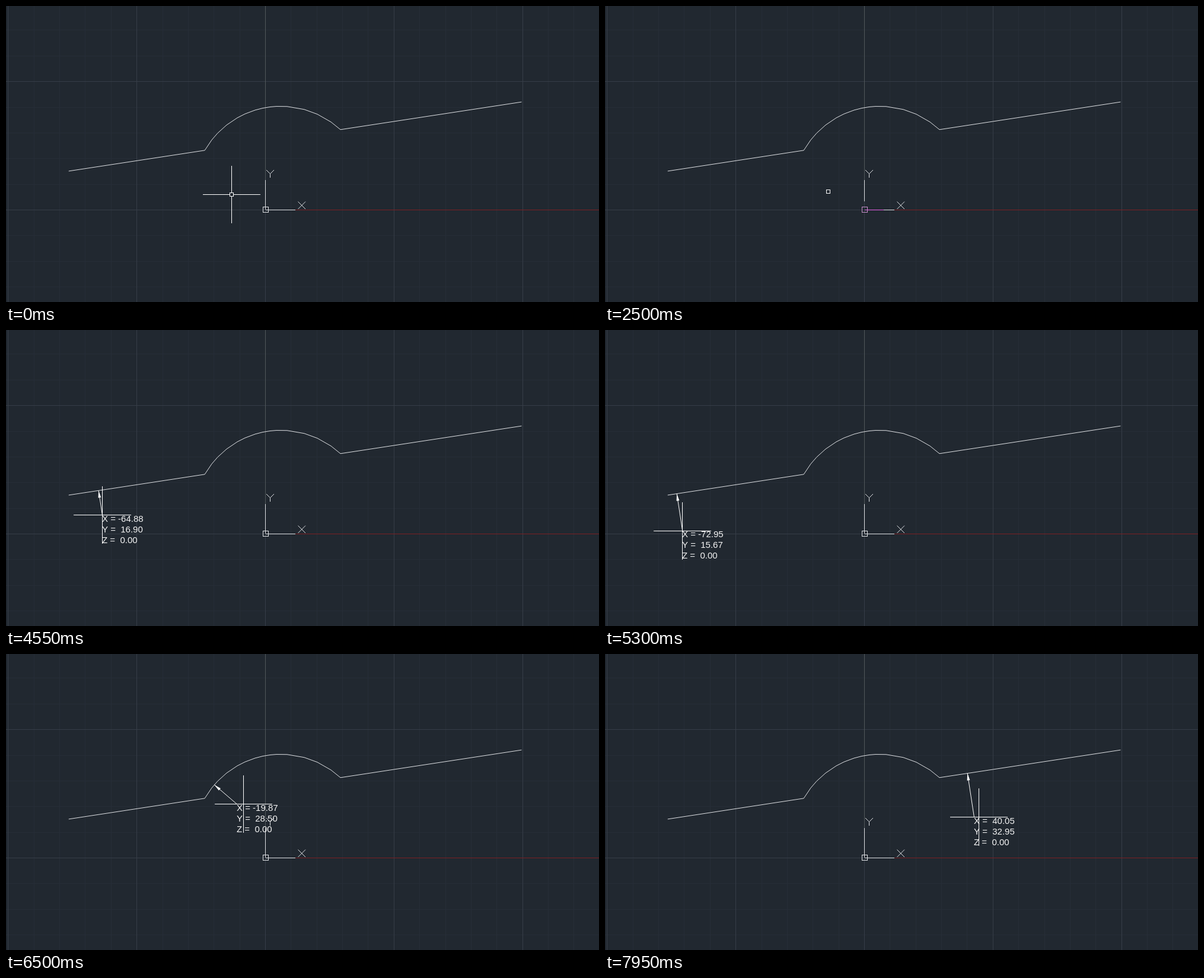
Write an HTML page with a canvas that moves like this. It is 1000x500 px and loops after 8 s.

```html
<!DOCTYPE html>
<html lang="en">
<head>
<meta charset="utf-8">
<title>Coordinate leader</title>
<style>
  html, body { margin: 0; width: 100%; height: 100%; overflow: hidden; background: #212830; }
  canvas { display: block; }
</style>
</head>
<body>
<canvas id="stage" width="1000" height="500"></canvas>
<script>
const ctx = document.getElementById('stage').getContext('2d');
const LOOP = 8000, STEP = 50;
const WHITE = '#fff', INK = '#dfe1e4', MAGENTA = '#ff00ff';
const UI_FONT = '11.3px "Noto Sans", sans-serif';
const LABEL_FONT = '15px "Liberation Sans", Arial, sans-serif';

// Drawing units to pixels
const ORIGIN = { x: 437.5, y: 344.5 }, SCALE = 4.337, SLOPE = 0.15291;
const toPx = (x, y) => ({ x: ORIGIN.x + x * SCALE, y: ORIGIN.y - y * SCALE });
const leftY = x => 16.90 + (x + 64.88) * SLOPE;
const rightY = x => 32.95 + (x - 40.05) * SLOPE;
const A = toPx(-76.5, leftY(-76.5)), B = toPx(-23.6, leftY(-23.6));
const C = toPx(29.17, rightY(29.17)), D = toPx(99.6, rightY(99.6));
const ARC = { ...toPx(5.9894, 6.2928), r: 34.088 * SCALE };
const ARC_X = [347, 357, 372, 390, 403, 420, 433, 446, 456, 474, 503, 525, 548];
const curve = [A, B, ...ARC_X.map(x => ({ x, y: ARC.y - Math.sqrt(ARC.r ** 2 - (x - ARC.x) ** 2) })), C, D];

// Keys: time, x, y
const cursorKeys = [
  [3000, 376, 313], [3750, 231, 263], [3800, 228, 261], [4150, 228, 261],
  [4550, 162, 312], [4900, 115, 341], [5150, 115, 341], [5900, 314, 313],
  [6000, 334, 311], [6850, 441, 223], [7150, 478, 233], [7700, 555, 267], [7950, 630, 275]
];
const labelKeys = [
  [4150, 228, 261], [4550, 162.353, 312], [4900, 115, 341], [5150, 115, 341],
  [5900, 308.372, 314], [6000, 323, 312], [6850, 436, 224],
  [7150, 478.728, 233.5], [7700, 553, 267], [7950, 622.421, 275]
];
const typing = [750, 850, 900, 1000, 1150, 1200, 1300];
const COMMAND = 'LABELPOINTS';

// Smooth interpolation without overshoot
function sample(keys, t, axis) {
  const last = keys.length - 1;
  if (t <= keys[0][0]) return keys[0][axis];
  if (t >= keys[last][0]) return keys[last][axis];
  const i = keys.findIndex(k => k[0] > t) - 1;
  const secant = j => (keys[j + 1][axis] - keys[j][axis]) / (keys[j + 1][0] - keys[j][0]);
  const speed = j => {
    if (j === 0 || j === last) return 0;
    const a = secant(j - 1), b = secant(j);
    return a * b <= 0 ? 0 : 2 * a * b / (a + b);
  };
  const h = keys[i + 1][0] - keys[i][0], u = (t - keys[i][0]) / h;
  const p = keys[i][axis], q = keys[i + 1][axis];
  const s = u * u * (3 - 2 * u);
  return p + (q - p) * s + h * u * (1 - u) * ((1 - u) * speed(i) - u * speed(i + 1));
}
const at = (keys, t) => ({ x: sample(keys, t, 1), y: sample(keys, t, 2) });

function path(points, color, width = 1) {
  ctx.beginPath();
  points.forEach(p => ctx.lineTo(p.x, p.y));
  ctx.strokeStyle = color;
  ctx.lineWidth = width;
  ctx.stroke();
}
const line = (x1, y1, x2, y2, color) => path([{ x: x1, y: y1 }, { x: x2, y: y2 }], color);

function box(x, y, w, h, color) {
  ctx.strokeStyle = color;
  ctx.lineWidth = 1;
  ctx.strokeRect(x + 0.5, y + 0.5, w - 1, h - 1);
}

function panel(x, y, w, h, fill) {
  ctx.fillStyle = fill;
  ctx.fillRect(x, y, w, h);
  box(x, y, w, h, '#000');
}

function text(str, x, y, font, color) {
  ctx.font = font;
  ctx.fillStyle = color;
  ctx.fillText(str, x, y);
}

function drawGrid() {
  ctx.fillStyle = '#212830';
  ctx.fillRect(0, 0, 1000, 500);
  const gap = SCALE * 10;
  for (const major of [false, true]) {
    const color = major ? '#363d47' : '#262d37';
    for (let i = -10; i <= 12; i++) {
      if ((i % 5 === 0) !== major) continue;
      const x = Math.floor(ORIGIN.x + i * gap) + 0.5;
      const y = Math.floor(ORIGIN.y + i * gap) + 0.5;
      line(x, 0, x, 500, color);
      line(0, y, 1000, y, color);
    }
  }
  line(437.5, 0, 437.5, 294, '#50575b');
  line(488, 344.5, 1000, 344.5, '#7a2024');
}

function drawAxes(tinted) {
  line(437.5, 294, 437.5, tinted ? 330 : 344, INK);
  line(438, 344.5, 488, 344.5, INK);
  if (tinted) line(438, 344.5, 470, 344.5, '#e860e8');
  box(433, 339, 10, 10, tinted ? '#c890cc' : INK);
  line(492.5, 330.5, 505, 343, INK);
  line(505, 330.5, 492.5, 343, INK);
  path([{ x: 439, y: 277 }, { x: 445.5, y: 283.5 }, { x: 452, y: 277 }], INK);
  line(445.5, 283.5, 445.5, 290, INK);
}

function drawCurve(lit) {
  if (lit) {
    path(curve, 'rgba(255,255,255,0.3)', 5);
    path(curve, INK, 2.5);
  } else {
    path(curve, INK);
  }
}

const pickBox = (p, color) => box(p.x - 3, p.y - 3, 7, 7, color);

function crosshair(p, withBox) {
  const x = p.x + 0.5, y = p.y + 0.5, gap = withBox ? 3 : 0;
  line(p.x - 48, y, p.x - gap, y, WHITE);
  line(p.x + gap, y, p.x + 49, y, WHITE);
  line(x, p.y - 48, x, p.y - gap, WHITE);
  line(x, p.y + gap, x, p.y + 49, WHITE);
  if (withBox) pickBox(p, WHITE);
}

function drawPrompt(p) {
  panel(p.x + 17, p.y + 17, 105, 23, '#9c9c9c');
  text('Select an Object:', p.x + 22, p.y + 31, UI_FONT, '#000');
}

function drawCommand(t) {
  const count = typing.filter(k => k <= t).length;
  if (!count) return;
  const complete = t >= 1600, typed = COMMAND.slice(0, count);
  ctx.font = UI_FONT;
  const typedWidth = ctx.measureText(typed).width;
  const shown = complete ? COMMAND : typed;
  const width = Math.max(43, Math.round(ctx.measureText(shown).width + 5));
  panel(392, 330, width, 20, '#f2f2f2');
  text(shown, 395, 344, UI_FONT, '#000');
  if (!complete) return;
  ctx.fillStyle = '#3399ff';
  ctx.fillRect(395 + typedWidth, 333, width - typedWidth - 5, 14);
  text(COMMAND.slice(count), 395 + typedWidth, 344, UI_FONT, WHITE);
  panel(392, 350, 120, 20, '#d8d8d8');
  text(COMMAND, 412, 364, UI_FONT, '#000');
}

function onSegment(p, a, b) {
  const dx = b.x - a.x, dy = b.y - a.y;
  const u = ((p.x - a.x) * dx + (p.y - a.y) * dy) / (dx * dx + dy * dy);
  const c = Math.min(1, Math.max(0, u));
  return { x: a.x + dx * c, y: a.y + dy * c };
}

function onArc(p) {
  const f = ARC.r / Math.hypot(p.x - ARC.x, p.y - ARC.y);
  const q = { x: ARC.x + (p.x - ARC.x) * f, y: ARC.y + (p.y - ARC.y) * f };
  if (q.y < ARC.y && q.x >= B.x && q.x <= C.x) return q;
  return p.x < ARC.x ? B : C;
}

function nearest(p) {
  const dist = q => Math.hypot(p.x - q.x, p.y - q.y);
  return [onSegment(p, A, B), onArc(p), onSegment(p, C, D)]
    .reduce((best, q) => dist(q) < dist(best) ? q : best);
}

function drawLeader(p) {
  const tip = nearest(p);
  const dx = p.x - tip.x, dy = p.y - tip.y, len = Math.hypot(dx, dy);
  path([tip, p], WHITE);
  if (len > 22) {
    const ux = dx / len, uy = dy / len, bx = tip.x + ux * 12, by = tip.y + uy * 12;
    ctx.beginPath();
    ctx.moveTo(tip.x, tip.y);
    ctx.lineTo(bx - uy * 2.4, by + ux * 2.4);
    ctx.lineTo(bx + uy * 2.4, by - ux * 2.4);
    ctx.fillStyle = WHITE;
    ctx.fill();
  }
  const values = { X: (tip.x - ORIGIN.x) / SCALE, Y: (ORIGIN.y - tip.y) / SCALE, Z: 0 };
  Object.entries(values).forEach(([axis, v], i) => {
    const num = (v < 0 ? '' : ' ') + v.toFixed(2);
    text(`${axis} = ${num}`, Math.floor(p.x), Math.floor(p.y) + 12 + i * 18, LABEL_FONT, '#f4f4f4');
  });
}

function render(t) {
  const pos = at(cursorKeys, t);
  const cursor = t < 50 ? { x: 380, y: 318 } : { x: Math.round(pos.x), y: Math.round(pos.y) };
  drawGrid();
  drawCurve(t >= 3800 && t < 3950);
  drawAxes(t >= 2500 && t < 2550);
  if (t < 2500) {
    crosshair(cursor, true);
    drawCommand(t);
  } else if (t < 3950) {
    pickBox(cursor, t < 2550 ? WHITE : MAGENTA);
    if (t >= 2550) drawPrompt(cursor);
  } else {
    if (t >= 4000) drawLeader(at(labelKeys, t));
    crosshair(cursor, false);
  }
}

function frame() {
  const t = performance.now() % LOOP;
  render(Math.floor(t / STEP) * STEP);
  requestAnimationFrame(frame);
}
frame();
</script>
</body>
</html>
```
